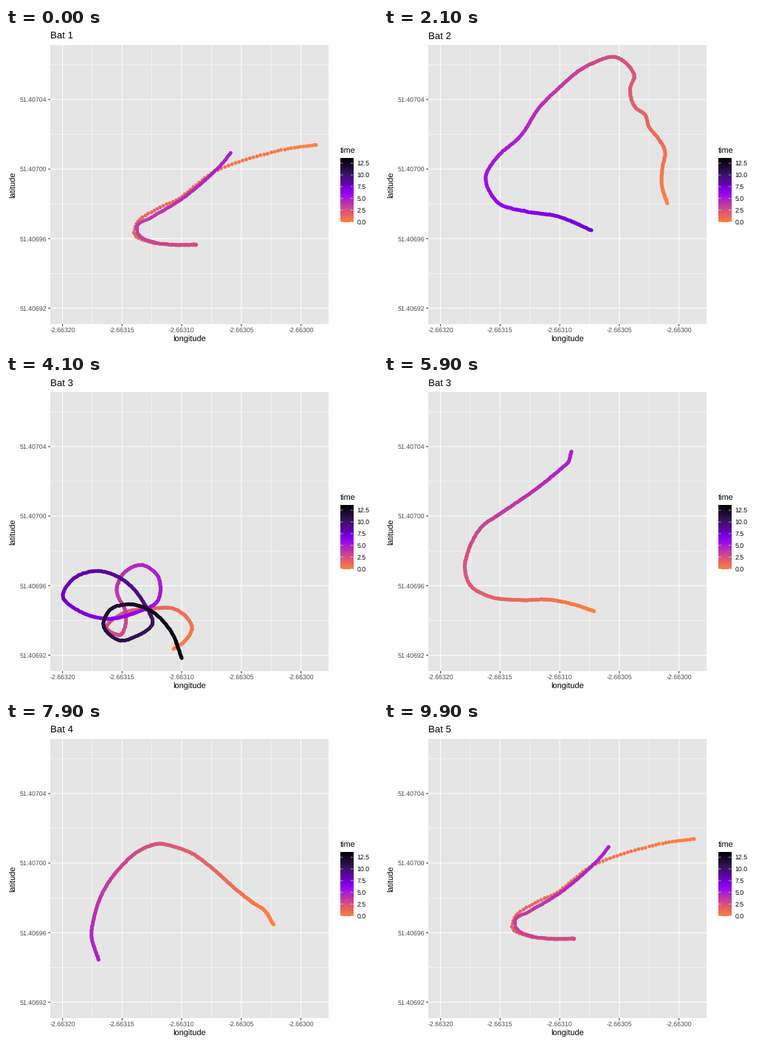
A matplotlib script that plays this animation: 504 by 432 pixels, repeating every 10 s.

```python
import numpy as np
import matplotlib.pyplot as plt
from matplotlib.animation import FuncAnimation
from matplotlib.colors import LinearSegmentedColormap
from matplotlib.patches import Rectangle

W, H, DPI = 504, 432, 72
T_MAX = 13.45
LEFT, RIGHT, TOP, BOTTOM = 60, 437, 23, 401
DOT = 5.0
plt.rcParams.update({"font.family": "Liberation Sans", "text.hinting": "none"})
rng = np.random.default_rng(1)

stops = [(0, "#ff7f3f"), (2.5, "#d5527c"), (5, "#a81cd2"), (6.2, "#8f00f5"),
         (8, "#6400b4"), (10, "#3a1563"), (T_MAX, "#000000")]
cmap = LinearSegmentedColormap.from_list("time", [(t / T_MAX, c) for t, c in stops], N=512)


def fly(points, progress=None):
    """Smooth curve through key points, sampled at the given fractions of its length."""
    p = np.array(points, float)
    knots = np.r_[0, np.cumsum(np.hypot(*np.diff(p, axis=0).T))]
    slope = np.gradient(p, knots, axis=0)
    if progress is None:
        progress = np.linspace(0, 1, int(knots[-1] / 1.4))
    s = progress * knots[-1]
    i = np.clip(np.searchsorted(knots, s) - 1, 0, len(p) - 2)
    h = (knots[i + 1] - knots[i])[:, None]
    u = (s - knots[i])[:, None] / h
    xy = (p[i] * (1 + 2 * u) * (1 - u)**2 + p[i + 1] * u**2 * (3 - 2 * u)
          + h * u * (1 - u) * (slope[i] * (1 - u) - slope[i + 1] * u))
    return xy + rng.normal(0, 0.2, xy.shape)


# Key points of each flight in stage pixels
out = [(420, 158.3), (385, 163), (343, 173), (308, 184), (278, 197), (256, 214),
       (236, 230), (203, 246), (177, 265), (174, 279), (192, 289), (222, 293), (257.5, 293.5)]
back = [(257.5, 293.5), (224, 293.7), (200, 290), (180, 280), (177.5, 269),
        (197, 256.5), (234, 234.5), (273, 203), (296, 180), (304.5, 169)]
descent = [(384, 237.5), (376.5, 214), (377.5, 187), (381, 168), (372, 150), (358.5, 133),
           (354, 118), (340, 107), (333.5, 83), (339, 63), (333, 53), (317, 40.3),
           (278, 50), (236, 82), (211, 107), (186, 145), (150, 179), (138, 200),
           (155, 237), (190, 248), (235, 255), (281, 274)]
loops = [(227, 371), (240, 362.5), (252, 342), (235, 320), (190, 317), (160, 322),
         (136, 343), (155, 352), (163, 326), (150, 290), (158, 270), (185, 257.3),
         (206, 273), (206, 305), (175, 322), (134, 330), (104, 322), (77, 299),
         (90, 277), (125, 265.5), (158, 277), (187, 309), (198, 338), (178, 353),
         (154, 359.5), (132, 338), (140, 319), (165, 310.5), (190, 316), (224, 348),
         (238, 383.5)]
hook = [(285, 320), (258, 311), (224, 304.3), (185, 304.8), (140, 299), (117, 285),
        (109.5, 263), (115, 236), (133, 205), (155, 189.5), (205, 155), (242, 125),
        (249.5, 118), (254, 103.5)]
arch = [(362.5, 274.5), (350, 255), (335, 245), (312, 227), (277, 196), (252, 178),
        (230, 169.5), (206, 165), (186, 171.5), (153, 199), (130, 233), (118, 271),
        (115.7, 287), (125.5, 322)]

# The first bat sets off fast and slows towards its turning point
slowing = np.sin(np.linspace(0, np.pi / 2, 105))**1.2
there_and_back = np.vstack([fly(out, slowing), fly(back, np.linspace(0, 1, 95))])
tracks = [(there_and_back, 5), (fly(descent), 7.4), (fly(loops), T_MAX),
          (fly(hook), 5), (fly(arch), 4.8)]

fig = plt.figure(figsize=(W / DPI, H / DPI), dpi=DPI, facecolor="white")
ax = fig.add_axes([0, 0, 1, 1])
ax.axis("off")


def line(xs, ys, color, width):
    ax.plot(xs, ys, color=color, lw=width, solid_capstyle="butt", snap=False, zorder=2)


def label(x, y, text, size=8.8, color="#4d4d4d", ha="left", va="baseline", **kw):
    return ax.text(x, y, text, fontsize=size, color=color, ha=ha, va=va, **kw)


# Panel, grid and axes
ax.add_patch(Rectangle((LEFT, TOP), RIGHT - LEFT, BOTTOM - TOP, fc="#e5e5e5", lw=0, zorder=0))
for i in range(9):
    x = 76.6 + 40.37 * i
    major = i % 2 == 0
    line([x, x], [TOP, BOTTOM], "white", 1.07 if major else 0.53)
    if major:
        line([x, x], [BOTTOM, BOTTOM + 2.8], "#333333", 1.07)
        label(x, 412, f"{-2.6632 + 0.000025 * i:.5f}", ha="center")
for i in range(8):
    y = 379.4 - 47.08 * i
    major = i % 2 == 0
    line([LEFT, RIGHT], [y, y], "white", 1.07 if major else 0.53)
    if major:
        line([LEFT - 2.8, LEFT], [y, y], "#333333", 1.07)
        label(55, y + 3.2, f"{51.40692 + 0.00002 * i:.5f}", ha="right")
label(248.3, 425, "longitude", 11, "black", ha="center")
label(10, 212, "latitude", 11, "black", ha="center", va="center", rotation=90)
title = label(60, 15.3, "", 13.2, "black")

# Colour bar
ax.imshow(np.linspace(1, 0, 300)[:, None], cmap=cmap, vmin=0, vmax=1, aspect="auto",
          extent=(453, 470.3, 263, 176.7), interpolation="bilinear", zorder=1)
label(453, 170, "time", 11, "black")
for t in np.arange(0, 13, 2.5):
    y = 262.7 - 6.37 * t
    for x in (453, 466.8):
        line([x, x + 3.5], [y, y], "white", 0.55)
    label(475.6, y + 3.2, f"{t:.1f}", color="black")

trails = [ax.scatter(*xy.T, c=np.linspace(0, t_end, len(xy)), cmap=cmap, vmin=0, vmax=T_MAX,
                     s=DOT**2, linewidths=0, zorder=3) for xy, t_end in tracks]
ax.set(xlim=(0, W), ylim=(H, 0))

SWITCHES = np.array([20, 40, 59, 79, 99])


def update(frame):
    # The title follows the path one frame later
    shown = np.sum(frame >= SWITCHES) % 5
    named = np.sum(frame > SWITCHES) % 5
    for i, trail in enumerate(trails):
        trail.set_visible(i == shown)
    title.set_text(f"Bat {named + 1}")
    return [*trails, title]


anim = FuncAnimation(fig, update, frames=100, interval=100, repeat=True, repeat_delay=0)
plt.show()
```
